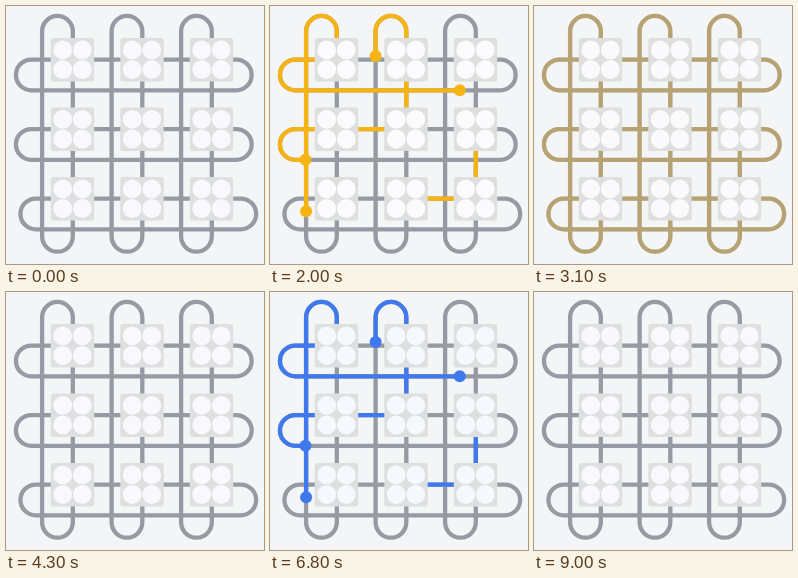
An HTML page for the animation above (9.5 s loop, 258 by 258 pixels).

```html
<!DOCTYPE html>
<html lang="en">
<head>
<meta charset="utf-8">
<title>Mesh of nodes</title>
<style>
  html, body { margin: 0; width: 100%; height: 100%; overflow: hidden; background: #f3f5f7; }
  svg { display: block; width: 100vw; height: 100vh; }
  path { fill: none; stroke-width: 4.3; }
  .track { stroke: #969aa2; }
  .box { fill: #dedfdf; }
</style>
</head>
<body>
<svg viewBox="0 0 258 258"></svg>
<script>
const LOOP = 9500, STEP = 100, PITCH = 69.5;
const BEND = 15.35;         // radius of the loops
const LEAD = 28;            // distance from a node's centre where a dot appears
const STAGGER = 150;        // delay between lanes
const LANE_END = 1100;      // when the last dots reach their node
const RUNS = [
  { start: 1600, fade: 600, color: '#f6b414', tint: [255, 255, 253] },
  { start: 6400, fade: 500, color: '#3f79ed', tint: [241, 250, 254] }
];
const PLAIN = [248, 248, 253];

const svg = document.querySelector('svg');
function add(tag, attrs, parent = svg) {
  const el = document.createElementNS('http://www.w3.org/2000/svg', tag);
  for (const key in attrs) el.setAttribute(key, attrs[key]);
  return parent.appendChild(el);
}

// Closed lanes, each leaving its diagonal node and returning to it
function laneStart(k) {
  return [66.8 + PITCH * k, 53.6 + PITCH * k];
}
function rowPath(k) {
  const [x, y] = laneStart(k);
  const left = k === 2 ? 29.8 : 25.3, right = left + 205;
  return `M${x} ${y}H${left}a${BEND} ${BEND} 0 0 0 0 ${2 * BEND}` +
    `H${right}a${BEND} ${BEND} 0 0 0 0 ${-2 * BEND}Z`;
}
function columnPath(k) {
  const [x, y] = laneStart(k);
  return `M${x} ${y}V25.3a${BEND} ${BEND} 0 0 0 ${-2 * BEND} 0` +
    `V230.3a${BEND} ${BEND} 0 0 0 ${2 * BEND} 0Z`;
}

const tracks = add('g', {}), trails = add('g', {});
const dots = add('g', {}), nodes = add('g', {}), cores = add('g', {});
const lanes = [];
function addLane(k, d, rest) {
  add('path', { d, class: 'track' }, tracks);
  const trail = add('path', { d }, trails);
  const dot = add('circle', { r: 6 }, dots);
  const length = trail.getTotalLength();
  const speed = (length - LEAD - rest) / (LANE_END - 2 * STAGGER);
  lanes.push({ trail, dot, length, speed, delay: k * STAGGER });
}
for (let k = 0; k < 3; k++) {
  addLane(k, rowPath(k), 26);
  addLane(k, columnPath(k), 21.5);
}

for (let i = 0; i < 9; i++) {
  const x = 66.5 + PITCH * (i % 3), y = 53.7 + PITCH * Math.floor(i / 3);
  add('rect', { x: x - 21.7, y: y - 21.7, width: 43.4, height: 43.4, rx: 2.5, class: 'box' }, nodes);
  for (const dx of [-9.8, 9.8])
    for (const dy of [-9.8, 9.8])
      add('circle', { cx: x + dx, cy: y + dy, r: 9.4 }, cores);
}

const clamp = v => Math.min(1, Math.max(0, v));

function draw(time) {
  const run = RUNS.find(r => time >= r.start && time < r.start + LANE_END + r.fade);
  const t = run ? time - run.start : 0;
  const alpha = run ? 1 - clamp((t - LANE_END) / run.fade) : 0;
  const mix = alpha * clamp(t / LANE_END);

  trails.setAttribute('opacity', alpha);
  if (run) {
    trails.setAttribute('stroke', run.color);
    dots.setAttribute('fill', run.color);
  }
  const tint = run ? run.tint : PLAIN;
  cores.setAttribute('fill', `rgb(${PLAIN.map((c, i) => Math.round(c + (tint[i] - c) * mix))})`);

  for (const { trail, dot, length, speed, delay } of lanes) {
    const live = run && t >= delay;
    const dist = live ? LEAD + (t - delay) * speed : 0;
    trail.style.display = live && t > delay ? '' : 'none';
    trail.setAttribute('stroke-dasharray', dist < length ? `${dist} ${length}` : 'none');
    const moving = live && dist < length;
    dot.style.display = moving ? '' : 'none';
    if (moving) {
      const p = trail.getPointAtLength(dist);
      dot.setAttribute('cx', p.x);
      dot.setAttribute('cy', p.y);
    }
  }
}

const origin = performance.now();
function tick() {
  const time = (performance.now() - origin) % LOOP;
  draw(Math.floor(time / STEP) * STEP);
  requestAnimationFrame(tick);
}
tick();
</script>
</body>
</html>
```
